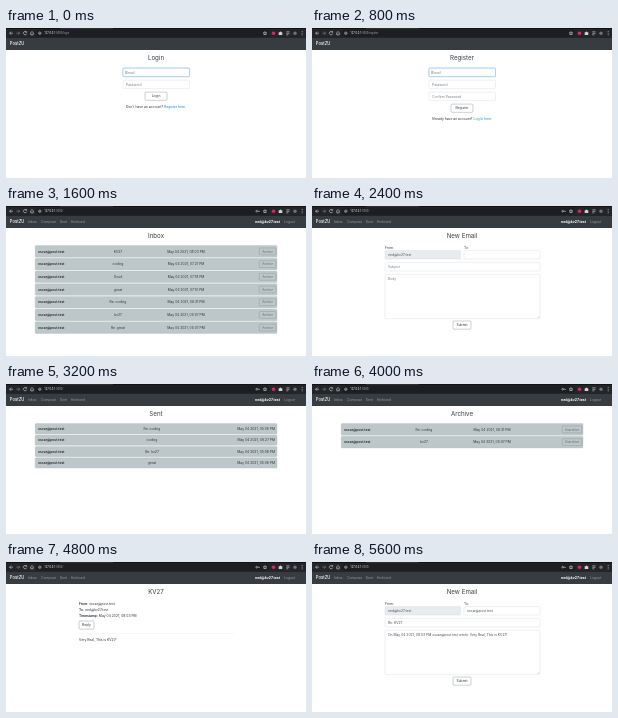
An HTML page for the animation above (6400 ms loop, 300 by 150 pixels).

```html
<!DOCTYPE html>
<html lang="en">
<head>
<meta charset="utf-8">
<title>Mail client tour</title>
<style>
  html, body { margin: 0; width: 100%; height: 100%; overflow: hidden; background: #fff; }
  svg { display: block; width: 100%; height: 100%; }
  text { font: 3.35px Inter, sans-serif; fill: #30363b; white-space: pre; }
  .title { font-size: 6.2px; fill: #3a3e46; }
  .bold { font-weight: 600; font-size: 3.3px; fill: #212529; }
  .brand { font-weight: 500; font-size: 4.2px; fill: #fff; }
  .nav { fill: #9a9da0; }
  .user { font-weight: 700; font-size: 3.4px; fill: #fff; }
  .hint { fill: #7b838a; }
  .value { fill: #495057; }
  .link { fill: #1f7cf0; }
  .small { font-size: 3px; fill: #60686e; }
  .url { font: 2.7px Roboto, sans-serif; fill: #999ca0; }
  .host { fill: #f1f3f4; }
</style>
</head>
<body>
<svg viewBox="0 0 300 150">
  <rect width="300" height="10" fill="#242528"/>
  <path d="M0 0h300v.8H0z" fill="#0c0c0d"/>
  <path d="M54 0h53v.8H54z" fill="#36373a"/>
  <rect x="29.5" y="1.6" width="234" height="7.2" rx="3.6" fill="#1d1e21"/>
  <g fill="none" stroke="#d4d6d8" stroke-width=".6">
    <path d="M7 5.2H3.6M5.2 3.6 3.6 5.2 5.2 6.8"/>
    <path d="M10.3 5.2h3.4M12.1 3.6 13.7 5.2 12.1 6.8" stroke="#85878a"/>
    <path d="M20.4 4A1.7 1.7 0 1 0 20.7 5.7M20.6 3.2v1.2h-1.2"/>
    <path d="M24.2 5.2 26 3.5l1.8 1.7M24.8 5v1.9h2.4V5"/>
    <circle cx="33.8" cy="5.2" r="1.2"/><path d="M33.8 5v.9"/>
    <path d="m259 3.5.5 1.2 1.3.1-1 .8.3 1.3-1.1-.7-1.1.7.3-1.3-1-.8 1.3-.1z"/>
    <path d="M280.3 3.8h3.2M280.3 5.3h3.2M280.3 6.8h2"/>
  </g>
  <circle cx="267.5" cy="5.2" r="1.8" fill="#e2245e"/>
  <path d="M272.7 4.2h1.1a.7.7 0 0 1 1.4 0h1.1v2.7h-3.6z" fill="#d1d3d5"/>
  <circle cx="289" cy="5.2" r="1.7" fill="#6d7378"/>
  <path d="M296.2 3.1v.8M296.2 4.8v.8M296.2 6.5v.8" stroke="#d4d6d8" stroke-width=".8"/>
  <rect y="10" width="300" height="12" fill="#373c41"/>
  <text class="brand" x="3.8" y="17.4">PostZU</text>
  <g id="page"></g>
</svg>
<script>
const SLOT = 800;
const ME = 'ned@kv27.test', FRIEND = 'oscar@post.test', TOPIC = 'KV27';
const page = document.getElementById('page');

const text = (x, y, label, cls = '', anchor = 'start') =>
  `<text x="${x}" y="${y}" class="${cls}" text-anchor="${anchor}">${label}</text>`;
const box = (x, y, w, h, stroke = '#cdd3d8', fill = '#fff', width = .35) =>
  `<rect x="${x}" y="${y}" width="${w}" height="${h}" rx="1" fill="${fill}" stroke="${stroke}" stroke-width="${width}"/>`;
const line = (path, stroke) =>
  `<path d="${path}" stroke="${stroke}" stroke-width=".3"/>`;
const title = label => text(150, 32, label, 'title', 'middle');
const stamp = time => `May 04 2021, ${time} PM`;
const url = path =>
  text(38.3, 6.3, `<tspan class="host">127.0.0.1</tspan>:8000/${path}`, 'url');

function button(cx, y, w, label) {
  return box(cx - w / 2, y, w, 8.2, '#6b767c') + text(cx, y + 5.3, label, '', 'middle');
}

function field(x, y, w, label, cls = 'hint', fill = '#fff') {
  return box(x, y, w, 8.4, '#cdd3d8', fill) + text(x + 3, y + 5.4, label, cls);
}

function signForm(heading, path, hints, question, link) {
  const end = 40 + 12 * hints.length;
  return url(path) + title(heading) +
    box(117, 40.2, 66.5, 8.4, '#c5e0ff', '#fff', 1.2) +
    hints.map((hint, i) => field(117, 40.2 + 12 * i, 66.5, hint)).join('') +
    box(117, 40.2, 66.5, 8.4, '#70b1f5', 'none') +
    line('M119.7 42.6v3.6', '#333') +
    button(150, end + .1, 22, heading) +
    text(150, end + 16.2, `${question} <tspan class="link">${link}</tspan>`, '', 'middle');
}

const account = () => url('') +
  '<g fill="none" stroke="#d4d6d8" stroke-width=".6"><circle cx="250.6" cy="5.2" r=".8"/><path d="M251.4 5.2h1.9v.8"/></g>' +
  text(22, 17.1, 'Inbox', 'nav') + text(35, 17.1, 'Compose', 'nav') +
  text(53.8, 17.1, 'Sent', 'nav') + text(64.7, 17.1, 'Archived', 'nav') +
  text(274, 17.1, ME, 'user', 'end') + text(278, 17.1, 'Logout', 'nav');

// Rows with an action button are taller than plain ones.
function mailbox(heading, mails, action) {
  const height = action ? 11.6 : 10.3;
  const rows = mails.map(([subject, time], i) => {
    const y = 39.6 + (height + 1.1) * i;
    const base = y + height / 2 + 1.1;
    let row = box(29.2, y, 241.8, height, '#aeb9bc', '#bdc7c9') +
      text(32, base, FRIEND, 'bold') +
      text(action ? 112 : 146, base, subject, '', 'middle') +
      text(action ? 180 : 269, base, stamp(time), '', action ? 'middle' : 'end');
    if (action) {
      const w = action.length > 7 ? 19.5 : 16.5;
      row += box(269.8 - w, y + 2.4, w, 6.8, '#7d878c', 'none') +
        text(269.8 - w / 2, base, action, 'small', 'middle');
    }
    return row;
  });
  return account() + title(heading) + rows.join('');
}

function compose(to, subject, body) {
  const cls = to ? 'value' : 'hint';
  return account() + title('New Email') +
    text(73, 42.9, 'From:') + text(152, 42.9, 'To:') +
    field(73, 44.6, 75.5, ME, 'value', '#e9ecef') +
    field(152, 44.6, 76, to, cls) +
    field(73, 56.6, 155, subject, cls) +
    box(73, 68.4, 155, 44.2) + text(76, 73.5, body, cls) +
    line('m225.6 112 1.8-1.8m-.8 1.8.8-.8', '#999') +
    button(150, 115, 18, 'Submit');
}

function reader() {
  const details = [['From', FRIEND], ['To', ME], ['Timestamp', stamp('08:03')]];
  return account() + title(TOPIC) +
    details.map(([name, value], i) =>
      text(73, 43 + 6 * i, `<tspan class="bold">${name}:</tspan> ${value}`)).join('') +
    button(80.5, 59, 15, 'Reply') +
    line('M73 71.5h155', '#e0e2e4') +
    text(73, 78.5, `Very Real, This is ${TOPIC}!`);
}

const lower = TOPIC.toLowerCase();
const scenes = [
  signForm('Login', 'login', ['Email', 'Password'], "Don't have an account?", 'Register here.'),
  signForm('Register', 'register', ['Email', 'Password', 'Confirm Password'],
    'Already have an account?', 'Log In here.'),
  mailbox('Inbox', [[TOPIC, '08:03'], ['coding', '07:21'], ['Good', '07:18'], ['great', '07:10'],
    ['Re: coding', '06:31'], [lower, '05:07'], ['Re: great', '05:07']], 'Archive'),
  compose('', 'Subject', 'Body'),
  mailbox('Sent', [['Re: coding', '05:06'], ['coding', '06:27'], ['Re: ' + lower, '05:08'],
    ['great', '05:06']]),
  mailbox('Archive', [['Re: coding', '06:31'], [lower, '05:07']], 'Unarchive'),
  reader(),
  compose(FRIEND, 'Re: ' + TOPIC,
    `On ${stamp('08:03')} ${FRIEND} wrote: Very Real, This is ${TOPIC}!`)
];

let shown = -1;
function draw(now) {
  const index = Math.floor(now / SLOT) % scenes.length;
  if (index !== shown) page.innerHTML = scenes[shown = index];
  requestAnimationFrame(() => draw(performance.now()));
}
draw(0);
</script>
</body>
</html>
```
